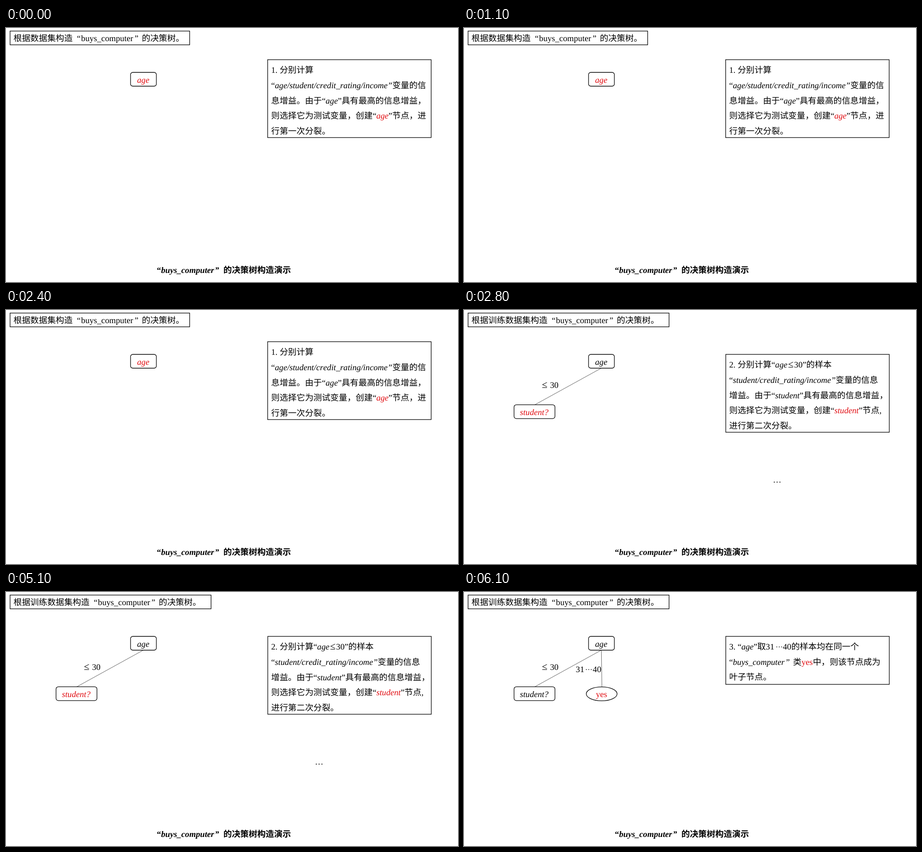
These frames come from a looping animation (998x561 px, 8000 ms). An HTML page:

```html
<!DOCTYPE html>
<html lang="zh-CN">
<head>
<meta charset="utf-8">
<title>决策树构造演示</title>
<style>
html, body { margin: 0; width: 100%; height: 100%; overflow: hidden; background: #fff; }
svg { display: block; width: 998px; height: 561px; }
text {
  font: 300 18.67px "Liberation Serif", "Noto Sans CJK SC", "Noto Sans CJK", serif;
  font-kerning: none;
  text-rendering: geometricPrecision;
  white-space: pre;
}
rect, ellipse { fill: #fff; stroke: #000; stroke-width: 1.3; }
line { stroke: #333; stroke-width: .8; }
.i { font-style: italic; }
.r { fill: #e00a0f; }
.mid { text-anchor: middle; }
.bold { font-weight: 700; }
.le { font-size: 22px; }
.dots { font-size: 16px; }

/* Hard cuts at 2.8 s and 5.3 s of an 8 s loop */
.step1, .step2, .step3, .later { animation: 8s step-end infinite; }
.step1 { animation-name: first; }
.step2 { animation-name: second; }
.step3 { animation-name: third; }
.later { animation-name: later; }
@keyframes first { 0% { opacity: 1 } 35%, 100% { opacity: 0 } }
@keyframes second { 0% { opacity: 0 } 35% { opacity: 1 } 66.25%, 100% { opacity: 0 } }
@keyframes third { 0% { opacity: 0 } 66.25%, 100% { opacity: 1 } }
@keyframes later { 0% { opacity: 0 } 35%, 100% { opacity: 1 } }
</style>
</head>
<body>
<svg viewBox="0 0 998 561">
  <text class="bold" y="540.5"><tspan x="333">“</tspan><tspan class="i" x="342.5">buys_computer</tspan><tspan class="i" x="461">”</tspan><tspan x="480">的决策树构造演示</tspan></text>

  <g class="step1">
    <rect x="9" y="6.7" width="396.5" height="30.5"/>
    <text y="28.8"><tspan x="16.5">根据数据集构造</tspan><tspan x="156.5">“</tspan><tspan x="165.8">buys_computer</tspan><tspan x="284">”</tspan><tspan x="300">的决策树。</tspan></text>
    <rect x="275" y="98" width="57" height="30.5" rx="5"/>
    <text class="i r mid" x="303" y="120.8">age</text>
    <rect x="577.7" y="70" width="361" height="172"/>
    <text x="585.5" y="99.3">1. 分别计算</text>
    <text x="585.5" y="133">“<tspan class="i">age/student/credit_rating/income”</tspan>变量的信</text>
    <text x="585.5" y="166.5">息增益。由于“<tspan class="i">age</tspan>”具有最高的信息增益，</text>
    <text x="585.5" y="200">则选择它为测试变量，创建“<tspan class="i r">age</tspan>”节点，进</text>
    <text x="585.5" y="233.5">行第一次分裂。</text>
  </g>

  <g class="later">
    <rect x="9" y="6.7" width="443.7" height="30.5"/>
    <text y="28.8"><tspan x="16.5">根据训练数据集构造</tspan><tspan x="193.8">“</tspan><tspan x="203.1">buys_computer</tspan><tspan x="321.3">”</tspan><tspan x="337.3">的决策树。</tspan></text>
    <line x1="303" y1="128.5" x2="156" y2="209.5"/>
    <rect x="275" y="98" width="57" height="30.5" rx="5"/>
    <text class="i mid" x="303" y="120.8">age</text>
    <text y="171.8"><tspan class="le" x="172">≤</tspan><tspan x="190">30</tspan></text>
    <rect x="110.5" y="209.3" width="90.3" height="30.5" rx="5"/>
  </g>

  <g class="step2">
    <text class="i r mid" x="155" y="231.8">student?</text>
    <rect x="578" y="98" width="361" height="172"/>
    <text x="585.5" y="127.3">2. 分别计算“<tspan class="i">age</tspan><tspan class="le" x="715.5">≤</tspan><tspan x="728.8">30”的样本</tspan></text>
    <text x="585.5" y="161">“<tspan class="i">student/credit_rating/income”</tspan>变量的信息</text>
    <text x="585.5" y="194.5">增益。由于“<tspan class="i">student</tspan>”具有最高的信息增益，</text>
    <text x="585.5" y="228">则选择它为测试变量，创建“<tspan class="i r">student</tspan>”节点,</text>
    <text x="585.5" y="261.5">进行第二次分裂。</text>
    <text x="682" y="381">…</text>
  </g>

  <g class="step3">
    <line x1="303.3" y1="128.5" x2="304.5" y2="209.5"/>
    <text class="i mid" x="155" y="231.8">student?</text>
    <text y="176.5"><tspan x="246.8">31</tspan><tspan class="dots" x="267.5" dy="-5">…</tspan><tspan x="284.3" dy="5">40</tspan></text>
    <ellipse cx="304" cy="225" rx="34" ry="15.3"/>
    <text class="r mid" x="303.7" y="232.3">yes</text>
    <rect x="578" y="98" width="361" height="106"/>
    <text x="585.5" y="127.3">3. “<tspan class="i">age</tspan>”取31<tspan class="dots" x="688" dy="-5">…</tspan><tspan x="704" dy="5">40的样本均在同一个</tspan></text>
    <text x="585.5" y="160.8">“<tspan class="i">buys_computer</tspan><tspan class="i" x="709">”</tspan><tspan x="726.6">类</tspan><tspan class="r">yes</tspan>中，则该节点成为</text>
    <text x="585.5" y="194.3">叶子节点。</text>
  </g>
</svg>
</body>
</html>
```
